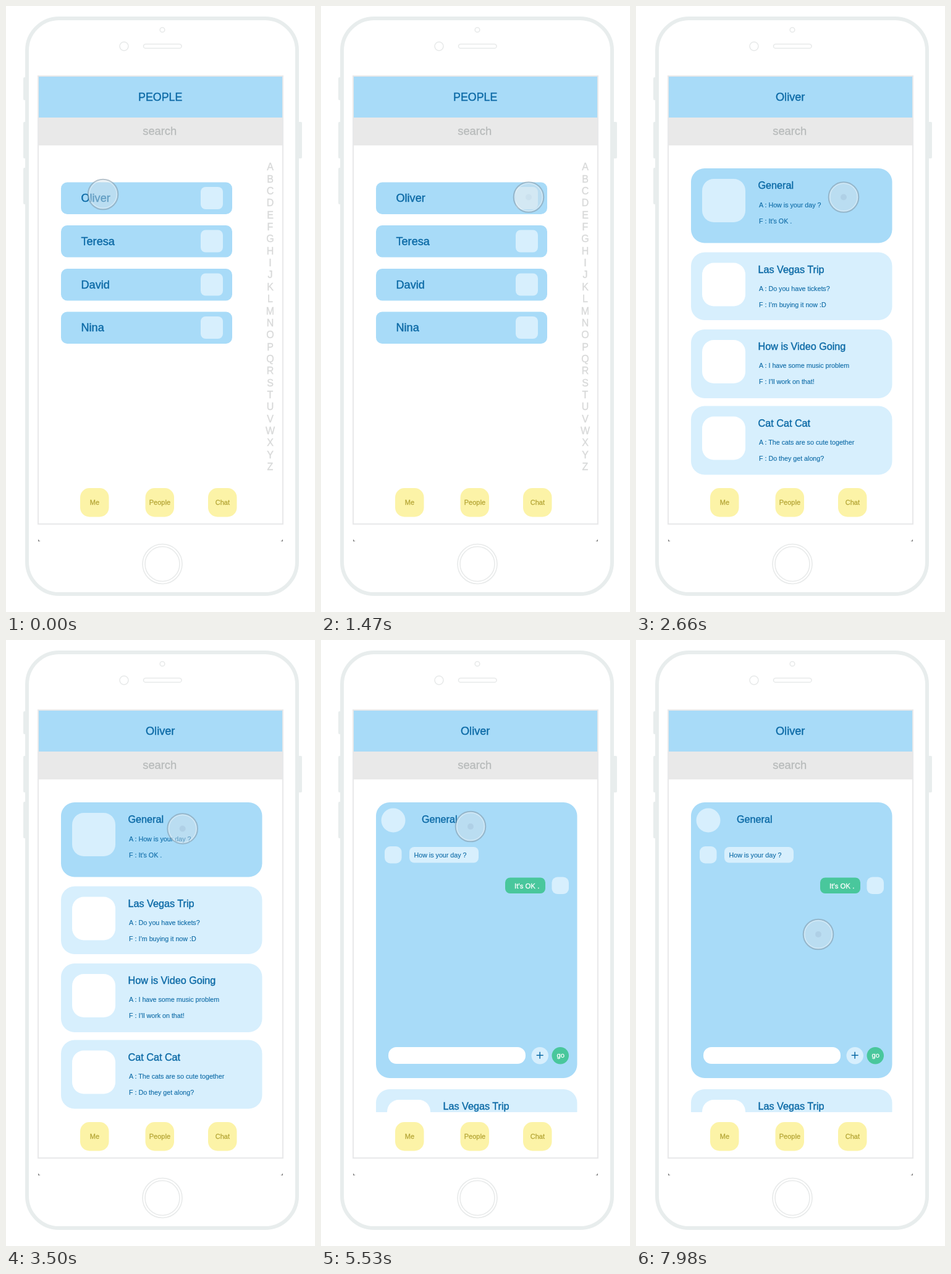
Write an HTML page that moves like this. It is 500 px wide and 978 px high and loops after 8 s.

```html
<!DOCTYPE html>
<html lang="en">
<head>
<meta charset="utf-8">
<title>People and chat prototype</title>
<style>
  html, body { margin: 0; width: 100%; height: 100%; overflow: hidden; background: #fff; }
  svg { display: block; width: 100vw; height: 100vh; }
  text { font-family: "Liberation Sans", Arial, sans-serif; white-space: pre; }
</style>
</head>
<body>
<svg viewBox="0 0 500 978">
  <defs>
    <clipPath id="view"><rect x="53" y="225" width="394" height="537"/></clipPath>
  </defs>
  <g fill="#e8eded">
    <rect x="28" y="115" width="6" height="37" rx="2"/>
    <rect x="28" y="187" width="6" height="59" rx="2"/>
    <rect x="28" y="261" width="6" height="59" rx="2"/>
    <rect x="471" y="187" width="8" height="59" rx="2"/>
  </g>
  <rect x="34" y="20" width="437" height="929" rx="52" fill="#fff" stroke="#e8eded" stroke-width="6"/>
  <g fill="none" stroke="#e8eaea" stroke-width="1.6">
    <circle cx="253" cy="38.5" r="3.8"/>
    <circle cx="191" cy="65" r="7"/>
    <rect x="222.5" y="61.5" width="61.5" height="6.8" rx="3.4"/>
    <circle cx="253" cy="900.5" r="32"/>
    <circle cx="253" cy="900.5" r="28"/>
  </g>
  <path d="M52 860v4h4q-3-.6-4-4zM448 860v4h-4q3-.6 4-4z" fill="#777"/>
  <rect x="52" y="113" width="396" height="723" fill="#fff" stroke="#e8e9ea" stroke-width="2"/>
  <rect x="53" y="114" width="394" height="66" fill="#a8dbf8"/>
  <rect x="53" y="180" width="394" height="45" fill="#e9e9e9"/>
  <g id="scene"></g>
</svg>
<script>
const LOOP = 8000, STEP = 70;
const INK = [12, 106, 166], SKY = [168, 219, 248], PALE = [215, 239, 253], WHITE = [255, 255, 255];
const GREEN = '#49c79c';
const OPEN = 1990, EXPAND = 4245, SPEED = 300;

// name, title, lines, closed top, open top, open height
const rows = [
  ['Oliver', 'General', 'How is your day ?', 'It’s OK .', 284.5, 262, 120.5],
  ['Teresa', 'Las Vegas Trip', 'Do you have tickets?', 'I’m buying it now :D', 354, 397.5, 109.5],
  ['David', 'How is Video Going', 'I have some music problem', 'I’ll work on that!', 424, 522, 111],
  ['Nina', 'Cat Cat Cat', 'The cats are so cute together', 'Do they get along?', 493.5, 645.5, 111]
];

// cursor stops: time, x, y
const path = [[0, 157, 304], [1000, 336, 308.5], [2950, 336, 308.5], [4000, 242, 301],
  [5700, 242, 301], [6600, 295, 475], [LOOP, 295, 475]];

const clamp = v => Math.min(1, Math.max(0, v));
const mix = (a, b, p) => a + (b - a) * p;
const rgb = (a, b = a, p = 0) => `rgb(${a.map((v, i) => Math.round(mix(v, b[i], p)))})`;
const smooth = u => u * u * (3 - 2 * u);

// cubic-bezier(.25, .1, .25, 1)
function ease(u) {
  if (u <= 0 || u >= 1) return clamp(u);
  let lo = 0, hi = 1, s;
  for (let i = 0; i < 24; i++) {
    s = (lo + hi) / 2;
    const x = .75 * s * (1 - s) + s ** 3;
    if (x < u) lo = s; else hi = s;
  }
  return .3 * s * (1 - s) ** 2 + 3 * s * s * (1 - s) + s ** 3;
}

const box = (x, y, w, h, r, fill) =>
  `<rect x="${x}" y="${y}" width="${w}" height="${h}" rx="${r}" fill="${fill}"/>`;

const label = (x, y, str, size, fill, bold = 0, anchor = 'start') =>
  `<text x="${x}" y="${y}" font-size="${size}" fill="${fill}" stroke="${fill}" ` +
  `stroke-width="${bold}" text-anchor="${anchor}">${str}</text>`;

const centered = (x, y, str, size, fill, bold) => label(x, y, str, size, fill, bold, 'middle');

function alphabet() {
  let out = '';
  for (let i = 0; i < 26; i++)
    out += centered(427.5, 265.2 + i * 19.36, String.fromCharCode(65 + i), 16, '#d8d9d9', .4);
  return out;
}

function row([name, title, ask, reply, y0, y1, h1], i, p, q, opened) {
  const shift = i ? 327.5 * q : 0;
  const y = mix(y0, y1, p) + shift;
  const h = i ? mix(51.5, h1, p) : mix(mix(51.5, h1, p), 445, q);
  const chat = !i && q > 0;
  const small = i ? 0 : q;
  const boxY = mix(mix(y0 + 7.5, y1 + 17, p), 271.5, small) + shift;
  const side = mix(mix(36, 70, p), 39, small);
  const card = i ? rgb(SKY, PALE, p) : rgb(SKY);
  const tile = i ? rgb(PALE, WHITE, p) : rgb(PALE);
  const w = mix(277, 325.5, p);
  let out = box(89, y, w, h, mix(10, 22, p), card);
  if (chat) out += chatItems(y, h);
  out += label(mix(mix(121.5, 197.5, p), 163, small), mix(y0 + 31.5, y1 + 33, p) + shift,
    opened ? title : name, opened ? 16.2 : 18.1, rgb(INK), .4);
  out += box(mix(mix(315, 107, p), 97.5, small), boxY, side, side,
    mix(mix(8, 19, p), 19.5, small), tile);
  if (chat) {
    out += label(mix(199, 150.5, q), mix(324, 350.5, q), ask, 10.7, rgb(INK), .12);
    out += label(mix(199, 313, q), mix(350.5, 400.5, q), reply, mix(10.7, 11.4, q),
      rgb(INK, WHITE, Math.sqrt(q)), .3);
  } else if (opened) {
    const line = y1 + shift + (i ? 62 : 62.5);
    out += label(199, line, 'A : ' + ask, 10.7, rgb(INK), .12);
    out += label(199, line + 26.4, 'F : ' + reply, 10.7, rgb(INK), .12);
  }
  return out;
}

function chatItems(y, h) {
  const pale = rgb(PALE);
  return `<clipPath id="card"><rect x="89" y="${y}" width="326" height="${h}"/></clipPath>` +
    '<g clip-path="url(#card)">' +
    box(103, 333, 27.5, 27.5, 9, pale) + box(143, 334, 112, 25.5, 8, pale) +
    box(298, 383.5, 65, 25.5, 8, GREEN) + box(373.5, 382.5, 27.5, 27.5, 9, pale) +
    box(109, 657, 222, 27, 13, '#fff') + box(340.5, 657, 27.5, 27.5, 13.75, pale) +
    box(373.5, 657, 27.5, 27.5, 13.75, GREEN) +
    `<path d="M348.7 670.3h11M354.2 664.8v11" stroke="${rgb(INK)}" stroke-width="1.5"/>` +
    centered(387.7, 674, 'go', 11.2, '#fff', .3) + '</g>';
}

function tabs() {
  return [['Me', 120], ['People', 225.5], ['Chat', 327]].map(([str, x]) =>
    box(x, 778, 46.5, 46.5, 15, '#fcf3a7') + centered(x + 23.4, 805, str, 11, '#b5a636', .3)).join('');
}

function cursor(t) {
  const i = path.findIndex((k, n) => n && t < k[0]);
  const [a, b] = [path[i - 1], path[i]];
  const u = smooth((t - a[0]) / (b[0] - a[0]));
  const at = `cx="${mix(a[1], b[1], u)}" cy="${mix(a[2], b[2], u)}"`;
  const dot = .4 * clamp((t - 1380) / 240);
  return `<circle ${at} r="24.3" fill="rgba(207,222,231,.45)" stroke="rgba(125,145,162,.5)" stroke-width="2"/>` +
    `<circle ${at} r="22.3" fill="none" stroke="rgba(255,255,255,.35)" stroke-width="1.5"/>` +
    `<circle ${at} r="5" fill="#9fbfd6" opacity="${dot}"/>`;
}

const scene = document.getElementById('scene');

function draw(t) {
  const p = ease((t - OPEN) / SPEED), q = ease((t - EXPAND) / SPEED);
  const opened = t >= OPEN;
  scene.innerHTML =
    centered(249.7, 153, opened ? rows[0][0] : 'PEOPLE', opened ? 18.2 : 17.8, rgb(INK), .4) +
    centered(248.7, 208, 'search', 18.3, '#b9bcbc', .4) +
    (opened ? '' : alphabet()) +
    '<g clip-path="url(#view)">' + rows.map((r, i) => row(r, i, p, q, opened)).join('') + '</g>' +
    tabs() + cursor(t);
}

let last = -1;
const start = performance.now();
function tick() {
  const t = Math.floor((performance.now() - start) % LOOP / STEP) * STEP;
  if (t !== last) draw(last = t);
  requestAnimationFrame(tick);
}
tick();
</script>
</body>
</html>
```
